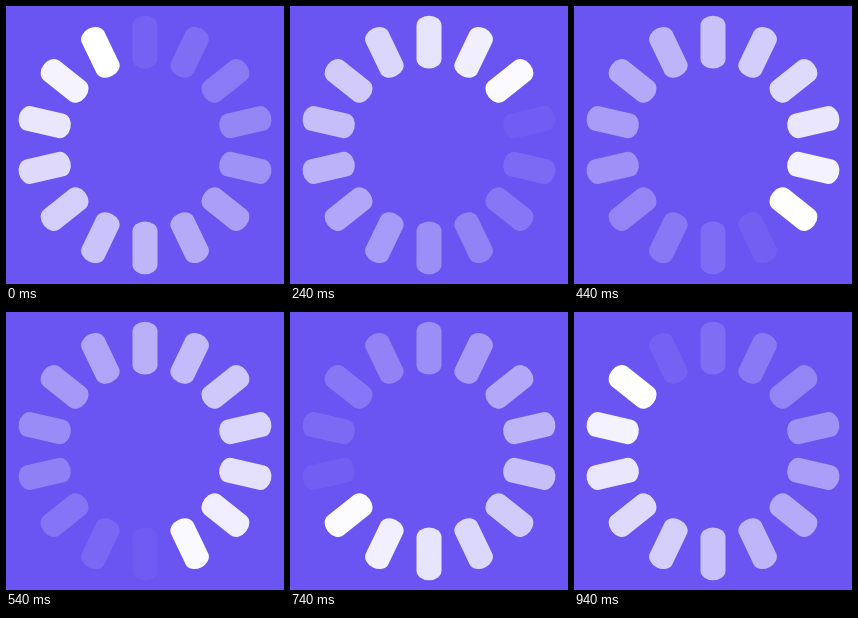
These frames come from a looping animation (278 px wide and 278 px high, 1010 ms). An HTML page:

```html
<!DOCTYPE html>
<html lang="en">
<head>
<meta charset="utf-8">
<title>Loading spinner</title>
<style>
  html, body { margin: 0; width: 100%; height: 100%; overflow: hidden; background: #6a55f2; }
  svg { display: block; width: 100vw; height: 100vh; }
</style>
</head>
<body>
<svg viewBox="0 0 100 100"><g id="bars" fill="#fff"></g></svg>
<script>
  const LOOP = 1010;
  const COUNT = 14;
  // Moments at which the picture advances, in ms.
  const TICKS = [0, 30, 100, 170, 240, 300, 370, 440, 540, 610, 670, 740, 810, 870, 940];

  const group = document.getElementById('bars');
  const shape = { x: 45.5, y: 3.5, width: 9, height: 19, rx: 4.5, ry: 3.5 };

  function makeBar(i) {
    const bar = document.createElementNS('http://www.w3.org/2000/svg', 'rect');
    for (const key in shape) bar.setAttribute(key, shape[key]);
    bar.setAttribute('transform', `rotate(${i * 360 / COUNT} 50 50)`);
    group.appendChild(bar);
    return bar;
  }

  const bars = Array.from({ length: COUNT }, (_, i) => makeBar(i));

  // Each bar lights up in turn, then fades evenly over one loop.
  function opacity(i, time) {
    const phase = time / LOOP + (COUNT - 1 - i) / COUNT;
    return 1 - phase % 1;
  }

  const start = performance.now();

  function draw(now) {
    const time = Math.max(0, now - start) % LOOP;
    const tick = TICKS.filter(t => t <= time).pop();
    bars.forEach((bar, i) => bar.setAttribute('opacity', opacity(i, tick).toFixed(4)));
    requestAnimationFrame(draw);
  }

  draw(start);
</script>
</body>
</html>
```
